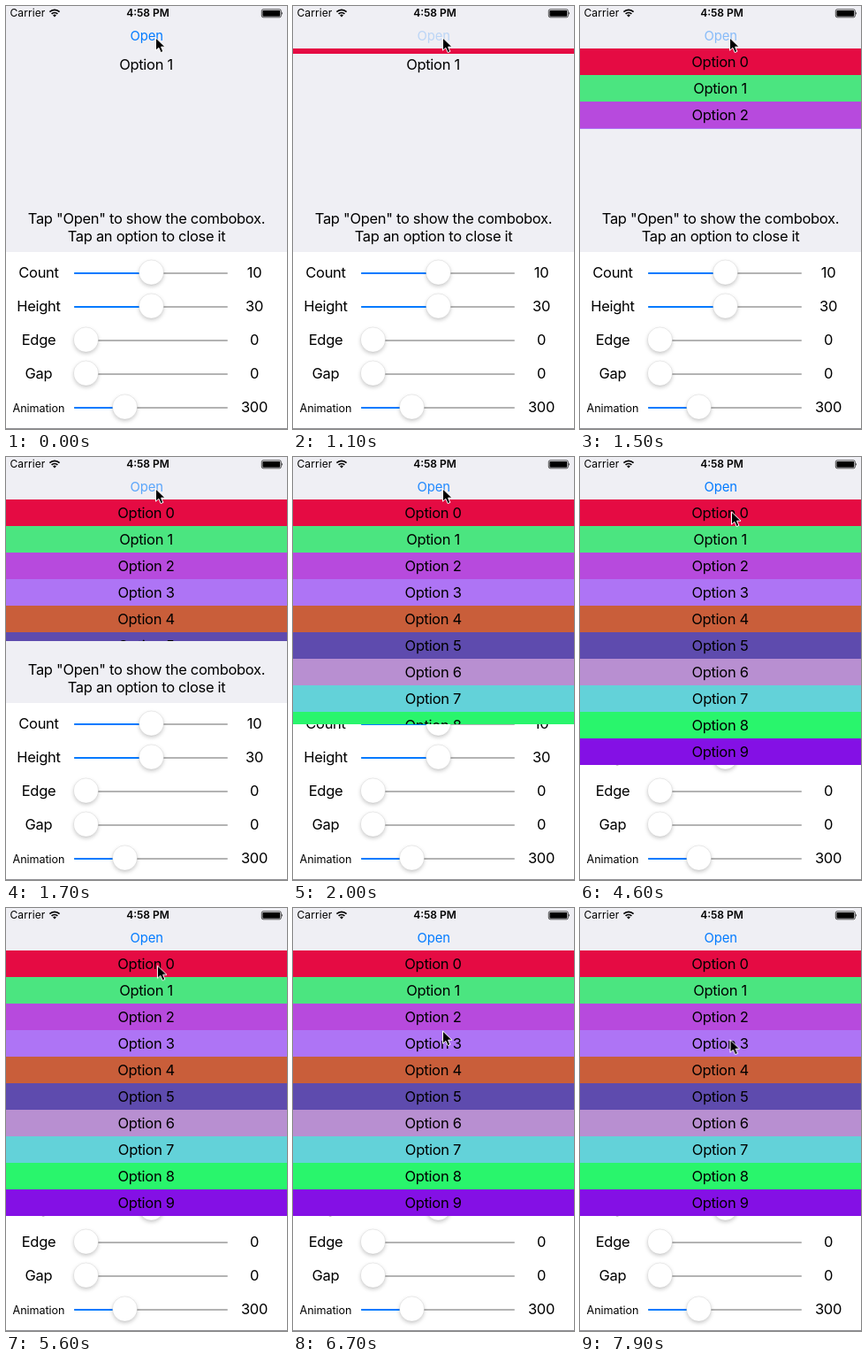
An HTML page for the animation above (8000 ms loop, 318x478 px).

```html
<!DOCTYPE html>
<html lang="en">
<head>
<meta charset="utf-8">
<title>Combobox demo</title>
<style>
  html, body { margin: 0; width: 100%; height: 100%; overflow: hidden; background: #fff; }
  #stage {
    position: absolute; left: 0; top: 0; width: 318px; height: 478px; overflow: hidden;
    font: 16.5px Inter, Roboto, sans-serif; letter-spacing: -.3px; color: #000;
  }
  svg { position: absolute; left: 0; top: 0; overflow: visible; }
  .mid { text-anchor: middle; }
  .status { font-size: 12px; letter-spacing: .1px; }
  .clock { font-weight: 600; letter-spacing: 0; }
  .small { font-size: 12.6px; letter-spacing: -.05px; }
  .open {
    font-size: 14.8px; letter-spacing: -.15px; fill: #007aff;
    animation: press 8s infinite;
  }
  .knob { fill: #fff; stroke: #0002; stroke-width: .6; filter: drop-shadow(0 2.5px 2px #0003); }

  #list {
    position: absolute; left: 0; top: 48px; width: 318px; height: 0; overflow: hidden;
    animation: unfold 8s infinite;
  }
  #list div { height: 30px; line-height: 30px; text-align: center; text-indent: -1px; }
  #cursor { animation: point 8s infinite; }

  @keyframes unfold {
    0% { height: 0; }
    11.9% { height: 0; animation-timing-function: ease-in-out; }
    29.9%, 100% { height: 300px; }
  }
  @keyframes press {
    0%, 10% { opacity: 1; }
    10.01% { opacity: .2; }
    11.9% { opacity: .2; animation-timing-function: ease-in-out; }
    29.9%, 100% { opacity: 1; }
  }
  @keyframes point {
    0% { transform: translate(169px, 36px); }
    45% { transform: translate(169px, 36px); animation-timing-function: ease-in-out; }
    56% { transform: translate(171px, 62px); }
    68% { transform: translate(171px, 62px); animation-timing-function: ease-in-out; }
    82% { transform: translate(169px, 139px); }
    89% { transform: translate(169px, 139px); animation-timing-function: ease-in-out; }
    97%, 100% { transform: translate(169.5px, 149px); }
  }
</style>
</head>
<body>
<div id="stage">
  <svg width="318" height="478">
    <rect width="318" height="278" fill="#efeff4"/>
    <rect y="278" width="318" height="200" fill="#fff"/>
    <rect y="477" width="318" height="1" fill="#8e8e93"/>

    <text class="status" x="4.5" y="12">Carrier</text>
    <g fill="none" stroke="#000" stroke-width="1.7">
      <path d="M49.4 6.6a8 8 0 0 1 11.2 0M51.6 8.9a4.9 4.9 0 0 1 6.8 0"/>
      <path d="M55 12.4l-1.9-1.9a2.7 2.7 0 0 1 3.8 0z" fill="#000" stroke="none"/>
    </g>
    <text class="status clock mid" x="160.5" y="12">4:58 PM</text>
    <rect x="289.3" y="3.8" width="22" height="9" rx="1.8" fill="none" stroke="#000" stroke-width=".7"/>
    <rect x="290.4" y="4.9" width="19.8" height="6.8" rx=".8"/>
    <path d="M312.3 6.6q1.7 1.6 0 3.4z"/>

    <text class="open mid" x="159.2" y="39">Open</text>
    <text class="mid" x="158.5" y="72">Option 1</text>
    <text class="mid" x="159" y="246">Tap "Open" to show the combobox.</text>
    <text class="mid" x="159" y="266">Tap an option to close it</text>
    <g id="sliders"></g>
  </svg>

  <div id="list"></div>

  <svg width="318" height="478">
    <path id="cursor" d="M.5 0V14.2L3.8 11.2L6.2 16.6L8.9 15.4L6.6 10.2H11Z"
      fill="#000" stroke="#fff" stroke-width="1" stroke-linejoin="round"/>
  </svg>
</div>
<script>
  const colors = ['#e50b43', '#4be580', '#b74add', '#ae74f5', '#c95e3a',
                  '#5e4bae', '#b88fd1', '#63d2d9', '#29f56c', '#8410e5'];
  document.getElementById('list').innerHTML = colors
    .map((color, i) => `<div style="background:${color}">Option ${i}</div>`).join('');

  // label, value, knob centre
  const sliders = [['Count', 10, 164.5], ['Height', 30, 164.5], ['Edge', 0, 90.5],
                   ['Gap', 0, 90.5], ['Animation', 300, 134.5]];
  document.getElementById('sliders').innerHTML = sliders.map(([label, value, x], i) => {
    const y = 301 + 38 * i;
    const small = label === 'Animation';
    return `<text class="mid ${small ? 'small' : ''}" x="37" y="${y + (small ? 5.5 : 6)}">${label}</text>
      <rect x="77" y="${y}" width="174" height="2" rx="1" fill="#b3b3b3"/>
      <rect x="77" y="${y}" width="${x - 77}" height="2" rx="1" fill="#007aff"/>
      <circle class="knob" cx="${x}" cy="${y}" r="14"/>
      <text class="mid" x="281" y="${y + 6}">${value}</text>`;
  }).join('');
</script>
</body>
</html>
```
